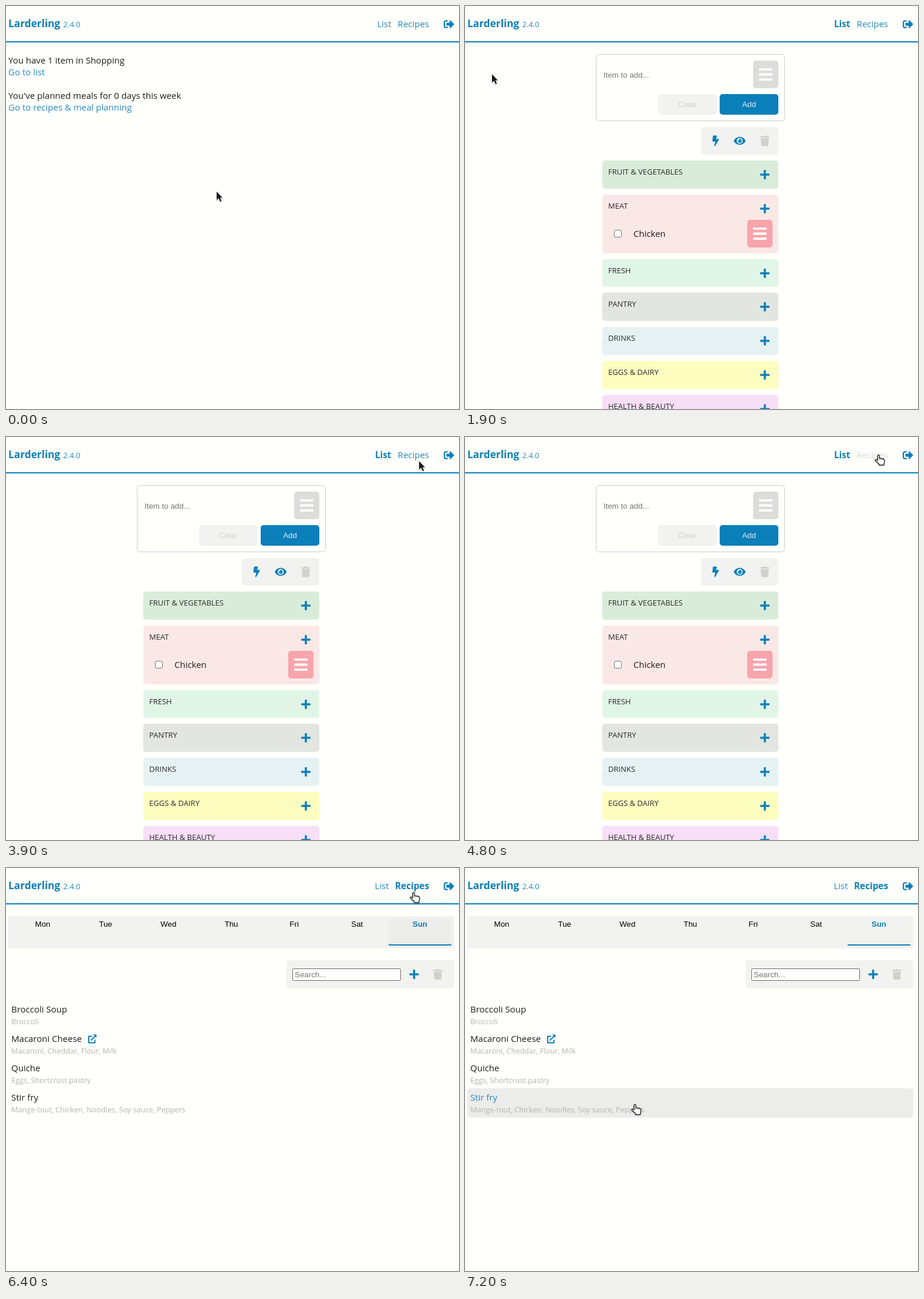
Recreate the animation shown at these times as an HTML page with a canvas. Size 772 by 686 pixels, loop 8 s.

```html
<!DOCTYPE html>
<html lang="en">
<head>
<meta charset="utf-8">
<title>Shopping list and meal planner</title>
<style>
html, body { margin: 0; width: 100%; height: 100%; overflow: hidden; background: #fffffb; }
canvas { display: block; }
</style>
</head>
<body>
<canvas id="stage" width="772" height="686"></canvas>
<script>
const ctx = document.getElementById('stage').getContext('2d');
const LOOP = 8000, STEP = 100;
const PAPER = '#fffffb', BLUE = '#0a7fba', LINK = '#2688c0', INK = '#1c1c1c';
const PALE = '#f2f2f0', HOVER = '#ececeb', GHOST = '#d8d8d6', HINT = '#757575', OFF = '#d0d0ce';
const SANS = '"Open Sans", "Noto Sans", sans-serif';
const BODY = `15px ${SANS}`;
const BOLD = `700 15.3px ${SANS}`;
const SMALL = `12.7px ${SANS}`;
const FORM = '13.333px "Liberation Sans", Arial, sans-serif';

// Pointer stops: time, x, y
const STOPS = [
  [0, 359, 316], [500, 359, 316], [1400, 50, 113], [1800, 50, 113], [1900, 46, 116],
  [3000, 46, 116], [3100, 52, 113], [3900, 704, 41], [4000, 707, 30], [6300, 707, 30],
  [6400, 697, 41], [6800, 384, 299], [6900, 384, 299], [7200, 292, 402], [LOOP, 292, 402]
];

const SECTIONS = [
  ['FRUIT & VEGETABLES', 263, 48, '#d9ecd9'],
  ['MEAT', 321, 100, '#fae8e6'],
  ['FRESH', 431, 47, '#e1f5e7'],
  ['PANTRY', 488, 48, '#e3e5e0'],
  ['DRINKS', 546, 48, '#e6f1f3'],
  ['EGGS & DAIRY', 604, 48, '#fdfdc0'],
  ['HEALTH & BEAUTY', 662, 48, '#f8dff8']
];
const DAYS = ['Mon', 'Tue', 'Wed', 'Thu', 'Fri', 'Sat', 'Sun'];
const DAY_WIDTH = 750 / 7;
const RECIPES = [
  ['Broccoli Soup', 'Broccoli'],
  ['Macaroni Cheese', 'Macaroni, Cheddar, Flour, Milk'],
  ['Quiche', 'Eggs, Shortcrust pastry'],
  ['Stir fry', 'Mange-tout, Chicken, Noodles, Soy sauce, Peppers']
];

const ICONS = {
  exit: new Path2D('M497 273L329 441c-15 15-41 4.5-41-17v-96H152c-13.3 0-24-10.7-24-24v-96c0-13.3 10.7-24 24-24h136V88c0-21.4 25.9-32 41-17l168 168c9.3 9.4 9.3 24.6 0 34zM192 436v-40c0-6.6-5.4-12-12-12H96c-17.7 0-32-14.3-32-32V160c0-17.7 14.3-32 32-32h84c6.6 0 12-5.4 12-12V76c0-6.6-5.4-12-12-12H96c-53 0-96 43-96 96v192c0 53 43 96 96 96h84c6.6 0 12-5.4 12-12z'),
  bolt: new Path2D('M296 160H181l42-130C227 15 216 0 200 0H56C44 0 34 9 32 21L0 261C-2 275 10 288 24 288h119L97 482c-4 16 8 30 23 30 8 0 16-4 21-12l176-304c9-16-2-36-21-36z'),
  eye: new Path2D('M572 241C518 136 411 64 288 64S58 136 4 241a32 32 0 0 0 0 30C58 376 165 448 288 448s230-72 284-177a32 32 0 0 0 0-30zM288 400a144 144 0 1 1 144-144 144 144 0 0 1-144 144zm0-240a95 95 0 0 0-25 4 48 48 0 0 1-67 67A96 96 0 1 0 288 160z'),
  trash: new Path2D('M432 32H312l-9-19A24 24 0 0 0 281 0H167a24 24 0 0 0-22 13L136 32H16A16 16 0 0 0 0 48v32a16 16 0 0 0 16 16h416a16 16 0 0 0 16-16V48a16 16 0 0 0-16-16zM53 467a48 48 0 0 0 48 45h246a48 48 0 0 0 48-45L416 128H32z')
};
const ARROW = new Path2D('M0 0V14.2L3.4 11.2L6 17L8.3 16L5.8 10.5H9.8Z');
const HAND = new Path2D('M5.2 10V2.3q0-1.6 1.4-1.6q1.5 0 1.5 1.6V6l6.4 1.2q2.2.5 2.2 2.5V12q0 2-1 3.4V17.6H7.5V15.8L1.4 10.2q-.8-1.6 1-1.8q1.1 0 2.8 1.6z');
const KNUCKLES = new Path2D('M8.1 6V9M11 6.8V9M13.8 7.3V9.3');

function text(str, x, y, font = BODY, color = INK, align = 'left') {
  ctx.font = font;
  ctx.fillStyle = color;
  ctx.textAlign = align;
  ctx.fillText(str, x, y);
}

function box(x, y, w, h, fill, radius = 0, stroke) {
  ctx.beginPath();
  ctx.roundRect(x, y, w, h, radius);
  ctx.fillStyle = fill;
  ctx.fill();
  if (stroke) {
    ctx.lineWidth = 1;
    ctx.strokeStyle = stroke;
    ctx.stroke();
  }
}

function icon(name, x, y, color = BLUE) {
  const scale = 18 / 512;
  ctx.save();
  ctx.translate(x, y);
  ctx.scale(scale, scale);
  ctx.fillStyle = color;
  ctx.fill(ICONS[name]);
  ctx.restore();
}

function plus(cx, cy) {
  box(cx - 8, cy - 1.75, 16, 3.5, BLUE, 1);
  box(cx - 1.75, cy - 8, 3.5, 16, BLUE, 1);
}

function menuButton(x, y, color) {
  box(x, y, 43, 47, color, 5);
  for (let i = 0; i < 3; i++) box(x + 10, y + 13 + i * 8.6, 23, 3.8, '#fff', 0.9);
}

function externalLink(x, y) {
  ctx.strokeStyle = ctx.fillStyle = BLUE;
  ctx.lineWidth = 2;
  ctx.stroke(new Path2D(`M${x + 7} ${y + 3}H${x + 1}V${y + 14}H${x + 11.5}V${y + 9}M${x + 4.5} ${y + 10}L${x + 12} ${y + 2.5}`));
  ctx.fill(new Path2D(`M${x + 8.5} ${y}H${x + 14.2}V${y + 5.7}Z`));
}

const inside = (p, x, y, w, h) => p.x >= x && p.x < x + w && p.y >= y && p.y < y + h;

function pointerAt(t) {
  const i = STOPS.findIndex((s, k) => k && t <= s[0]);
  const [t0, x0, y0] = STOPS[i - 1], [t1, x1, y1] = STOPS[i];
  const u = (t - t0) / (t1 - t0);
  const e = u < 0.5 ? 2 * u * u : 1 - 2 * (1 - u) ** 2;
  return { x: Math.round(x0 + (x1 - x0) * e), y: Math.round(y0 + (y1 - y0) * e) };
}

function navLink(label, right, current, over) {
  const color = over ? GHOST : current ? BLUE : LINK;
  text(label, right, 36, current ? BOLD : BODY, color, 'right');
}

function drawHeader(page, p) {
  const over = inside(p, 667, 20, 55, 20);
  text('Larderling', 4, 36, `700 17.3px ${SANS}`, BLUE);
  text('2.4.0', 97.5, 36, `13px ${SANS}`, LINK);
  navLink('List', page === 'recipes' ? 652.5 : 656.5, page === 'list', false);
  navLink('Recipes', 721, page === 'recipes', over);
  icon('exit', 746, 22);
  box(0, 60, 772, 2, BLUE);
  return over;
}

function drawHome(p) {
  const overList = inside(p, 4, 102, 64, 20);
  const overMeals = inside(p, 4, 162, 213, 20);
  text('You have 1 item in Shopping', 4, 98);
  text('Go to list', 4, 118, BODY, overList ? GHOST : LINK);
  text("You've planned meals for 0 days this week", 4, 158);
  text('Go to recipes & meal planning', 4, 178, BODY, overMeals ? GHOST : LINK);
  return overList || overMeals;
}

function drawList() {
  box(223.5, 82.5, 321, 113, PAPER, 5, '#ccc');
  text('Item to add...', 236, 122, FORM, HINT);
  menuButton(491, 93, '#dcdcda');
  box(329, 150, 100, 35, PALE, 5);
  text('Clear', 379, 172, FORM, '#cfcfcd', 'center');
  box(434, 150, 100, 35, BLUE, 5);
  text('Add', 484, 172, FORM, '#dcecf5', 'center');

  box(402, 206, 132, 47, PALE, 5);
  icon('bolt', 421.5, 220.5);
  icon('eye', 458, 220.5);
  icon('trash', 503, 220.5, OFF);

  for (const [name, y, h, color] of SECTIONS) {
    box(234, y, 300, h, color, 5);
    text(name, 244, y + 24, `13px ${SANS}`, '#2a2a2a');
    plus(511, y + 24);
  }
  box(254.5, 381.5, 12, 12, '#fff', 2.5, '#767676');
  text('Chicken', 287, 393);
  menuButton(481, 364, '#f7a4ab');
  return false;
}

function drawRecipes(p) {
  let over = false;
  box(4, 82, 760, 55, PALE);
  DAYS.forEach((day, i) => {
    const x = 9 + i * DAY_WIDTH, today = day === 'Sun';
    if (inside(p, x, 41, DAY_WIDTH, 91)) {
      over = true;
      box(Math.round(x), 87, 107, 45, HOVER);
    }
    text(day, x + DAY_WIDTH / 2, 100, today ? 'bold ' + FORM : FORM, today ? BLUE : '#000', 'center');
  });
  box(652, 130, 107, 2, BLUE);

  box(478, 157, 286, 48, PALE, 5);
  box(488.5, 171.5, 184, 20, '#fff', 1, '#6a6a6a');
  text('Search...', 492, 186, FORM, HINT);
  plus(695.5, 181);
  icon('trash', 728, 172, OFF);

  RECIPES.forEach(([name, parts], i) => {
    const y = 225 + i * 50;
    const active = inside(p, 4, y, 760, 50);
    if (active) {
      over = true;
      box(4, y, 760, 50, HOVER, 5);
    }
    text(name, 9, y + 21, BODY, active ? LINK : INK);
    text(parts, 9, y + 41, SMALL, '#b4b4b4');
    if (name === 'Macaroni Cheese') externalLink(140, y + 8.5);
  });
  return over;
}

function drawPointer(p, hand) {
  const shape = hand ? HAND : ARROW;
  ctx.save();
  ctx.translate(hand ? p.x - 9 : p.x, p.y);
  ctx.lineJoin = 'round';
  ctx.shadowColor = 'rgba(0,0,0,.3)';
  ctx.shadowBlur = 2;
  ctx.shadowOffsetY = 1;
  ctx.lineWidth = hand ? 1.2 : 1.6;
  ctx.strokeStyle = hand ? '#222' : '#fff';
  ctx.stroke(shape);
  ctx.shadowColor = 'transparent';
  ctx.fillStyle = hand ? '#fff' : '#1a1a1a';
  ctx.fill(shape);
  if (hand) {
    ctx.stroke(HAND);
    ctx.lineWidth = 0.7;
    ctx.stroke(KNUCKLES);
  }
  ctx.restore();
}

const PAGES = { home: drawHome, list: drawList, recipes: drawRecipes };

function draw(now) {
  const t = Math.floor((now % LOOP) / STEP) * STEP;
  const page = t < 1900 ? 'home' : t < 5200 ? 'list' : 'recipes';
  const p = pointerAt(t);
  box(0, 0, 772, 686, PAPER);
  const overNav = drawHeader(page, p);
  const overPage = PAGES[page](p);
  drawPointer(p, overNav || overPage);
}

let start;
function tick(now) {
  start ??= now;
  draw(now - start);
  requestAnimationFrame(tick);
}
draw(0);
requestAnimationFrame(tick);
</script>
</body>
</html>
```
